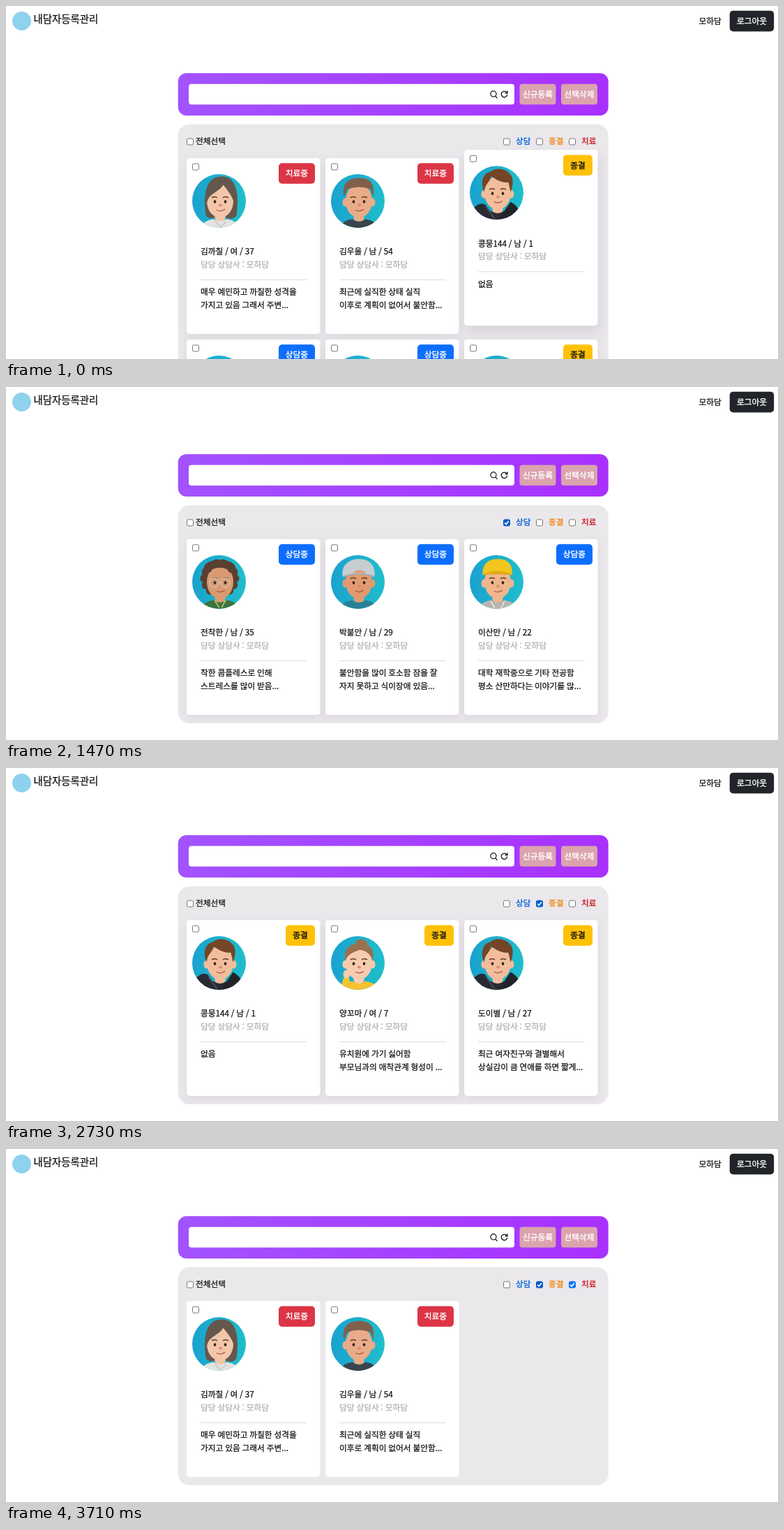
An HTML page for the animation above (3780 ms loop, 1107 by 506 pixels).

```html
<!DOCTYPE html>
<html lang="ko">
<head>
<meta charset="utf-8">
<style>
  html, body { margin: 0; width: 100%; height: 100%; overflow: hidden; background: #fff; }
  svg { display: block; }
  text { font: 11.7px 'Noto Sans CJK KR', 'Noto Sans KR', sans-serif; word-spacing: -.4px; stroke-width: .25px; }
  .shade { filter: drop-shadow(0 5px 7px rgba(30, 20, 60, .075)); }
  .flat .shade { filter: none; }
  .box { fill: #fff; stroke: #767676; }
  .tick { fill: none; stroke: #fff; stroke-width: 1.7; visibility: hidden; }
  .hover .box { stroke: #4a4a4a; }
  .checked .box { fill: #0075ff; stroke: #0075ff; }
  .checked.hover .box { fill: #005cc8; stroke: #005cc8; }
  .checked .tick { visibility: visible; }
</style>
</head>
<body>
<svg id="stage" width="1107" height="506" viewBox="0 0 1107 506"></svg>
<script>
const LOOP = 3780, STEP = 70;
const COUNSELOR = '모하담';

const rect = (x, y, w, h, r, fill, extra = '') =>
  `<rect x="${x}" y="${y}" width="${w}" height="${h}" rx="${r}" fill="${fill}" ${extra}/>`;
const oval = (x, y, rx, ry, fill) => `<ellipse cx="${x}" cy="${y}" rx="${rx}" ry="${ry}" fill="${fill}"/>`;
const path = (d, fill) => `<path d="${d}" fill="${fill}"/>`;
const line = (d, color, width) =>
  `<path d="${d}" fill="none" stroke="${color}" stroke-width="${width}" stroke-linecap="round"/>`;
const at = (x, y, body, extra = '') => `<g transform="translate(${x} ${y})" ${extra}>${body}</g>`;
// y is the visual middle of the line
const text = (x, y, s, fill = '#111', style = '') =>
  `<text x="${x}" y="${y + 4.4}" fill="${fill}" stroke="${fill}" style="${style}">${s}</text>`;
const centered = (x, y, s, fill) => text(x, y, s, fill, 'text-anchor:middle;stroke-width:.35px');
const checkbox = (x, y, id = '') => at(x, y,
  '<rect class="box" x=".5" y=".5" width="9" height="9" rx="1.8"/><path class="tick" d="M2.2 5.2 4.2 7.2 7.9 2.8"/>',
  id && `id="${id}"`);

// Avatars, drawn around the middle of a 77 px disc
const looks = {
  woman: {
    skin: '#f3c6a9', shirt: '#e3e3e1', hair: '#66574d',
    back: h => path('M-19 20C-22 0-23-35 4-35S27 5 25 21Q19 28 10 24H-8Q-15 27-19 20Z', h),
    front: h => path('M-18 4C-22-22-12-35 4-35S26-22 22 5C20-6 14-13 6-23C2-15-12-11-16-2Z', h)
      + line('M-5 30 2 37 10 30', '#c5c6c7', 1.5)
  },
  man: {
    skin: '#eaab88', shirt: '#39454d', hair: '#80604c', ears: true,
    front: h => path('M-20-6C-24-26-13-33 2-33S25-26 22-6L18-17Q2-23-15-17Z', h)
  },
  youth: {
    skin: '#f2bd9b', shirt: '#292b33', hair: '#744526', ears: true,
    front: h => path('M-18-1C-26-20-15-30-9-30C0-38 15-33 18-28C26-22 23-8 20-1L17-15C7-14-1-19-8-24C-9-15-17-13-18-1Z', h)
      + path('M-33 22Q-24 12-16 17L-1 39H-30Z', '#292b33') + path('M20 13Q30 18 33 28L20 39H2Z', '#23242b')
      + line('M-15 20-3 37', '#4b4d56', 2)
  },
  curly: {
    skin: '#d99a72', shirt: '#3d7440', hair: '#594031',
    back: h => curls(h, 22, 14, -5, 22) + oval(1, -7, 26, 25, h),
    front: h => curls(h, 17, 9, -19, 7, Math.PI)
      + [-7, 9].map(x => `<circle cx="${x}" cy="1" r="6.5" fill="none" stroke="#d8c9bd" stroke-width="1.3"/>`).join('')
      + line('M-6 27 0 36M9 27 4 36', '#b9c75f', 1.6)
  },
  greyCap: {
    skin: '#e29a70', shirt: '#2a8197', hair: '#c8cdd1', ears: true,
    front: h => path('M-22-8C-24-25-12-33 2-33S26-24 24-8Q2-14-22-8Z', h)
      + path('M-8-12Q2-22 13-12Q2-14-8-12Z', '#e29a70') + line('M-21-8Q2-15 23-8', '#a5abb0', 2)
  },
  yellowCap: {
    skin: '#efb68d', shirt: '#b8b4b2', hair: '#f4c51e', ears: true,
    front: h => path('M-20-10C-21-27-11-33 2-33S24-26 22-10Q1-18-20-10Z', h)
      + path('M-21-10Q2-22 23-10Q2-12-21-10Z', '#e0ab12') + line('M-8 28-3 37M11 28 7 37', '#eee', 1.5)
  },
  girl: {
    skin: '#f7cbae', shirt: '#f3c32f', hair: '#98714f', ears: true,
    back: h => oval(5, -27, 9, 7, h),
    front: h => path('M-18-3C-22-22-10-28 3-28S25-22 21-3C19-12 13-17 3-19C-4-16-14-14-18-3Z', h)
      + path('M-26 39-20 20-12 22-11 39Z', '#f3c32f') + oval(-16, 16, 5, 6, '#f7cbae')
  }
};

function curls(fill, rx, count, cy, ry, sweep = 2 * Math.PI) {
  let out = '';
  for (let i = 0; i <= count; i++) {
    const a = Math.PI + sweep * i / count;
    out += oval(1 + rx * Math.cos(a), cy + ry * Math.sin(a), 6, 6, fill);
  }
  return out;
}

const avatar = ([name, { skin, shirt, hair, ears, back, front }]) => `<g id="${name}">
  <circle r="38.5" fill="url(#disc)"/><g clip-path="url(#round)">
  ${back ? back(hair) : ''}
  ${rect(-6, 12, 15, 18, 6, skin)}
  ${path('M-28 42Q-25 28-8 26Q1 33 11 26Q28 28 31 42Z', shirt)}
  ${ears ? oval(-18, 2, 4, 6, skin) + oval(21, 2, 4, 6, skin) : ''}
  ${oval(1.5, 0, 19, 24, skin)}
  ${oval(-6, 1, 1.8, 2.3, '#33251f') + oval(9, 1, 1.8, 2.3, '#33251f')}
  ${line('M-10-5Q-6-7-3-5M6-5Q9-7 13-5', '#5b3c2b', 1.5)}
  ${oval(2, 6, 2.4, 2, '#d98d6e')}
  ${line('M-3 13Q3 16 8 12', '#a9503f', 1.3)}
  ${front(hair)}</g></g>`;

// Cards
const badges = {
  treat: ['치료중', '#dc3545', '#fff', 52],
  talk: ['상담중', '#0d6efd', '#fff', 52],
  done: ['종결', '#ffc107', '#111', 42]
};
const people = {
  grumpy: ['woman', 'treat', '김까칠 / 여 / 37', '매우 예민하고 까칠한 성격을', '가지고 있음 그래서 주변...'],
  gloomy: ['man', 'treat', '김우울 / 남 / 54', '최근에 실직한 상태 실직', '이후로 계획이 없어서 불안함...'],
  blank: ['youth', 'done', '콩뭉144 / 남 / 1', '없음', ''],
  kind: ['curly', 'talk', '전착한 / 남 / 35', '착한 콤플레스로 인해', '스트레스를 많이 받음...'],
  anxious: ['greyCap', 'talk', '박불안 / 남 / 29', '불안함을 많이 호소함 잠을 잘', '자지 못하고 식이장애 있음...'],
  restless: ['yellowCap', 'talk', '이산만 / 남 / 22', '대학 재학중으로 기타 전공함', '평소 산만하다는 이야기를 많...'],
  child: ['girl', 'done', '양꼬마 / 여 / 7', '유치원에 가기 싫어함', '부모님과의 애착관계 형성이 ...'],
  parted: ['youth', 'done', '도이별 / 남 / 27', '최근 여자친구와 결별해서', '상실감이 큼 연애를 하면 짧게...']
};
const lists = {
  all: ['grumpy', 'gloomy', 'blank', 'kind', 'anxious', 'child'],
  talk: ['kind', 'anxious', 'restless'],
  done: ['blank', 'child', 'parted'],
  treat: ['grumpy', 'gloomy']
};

function card(person, index) {
  const [look, status, title, first, second] = people[person];
  const [label, color, ink, width] = badges[status];
  const body = rect(0, 0, 191.5, 252, 4.5, '#fff', 'class="shade"')
    + checkbox(8, 7.5)
    + `<use href="#${look}" x="46.5" y="61.5"/>`
    + rect(184 - width, 7.3, width, 29.4, 5, color)
    + centered(184 - width / 2, 22, label, ink)
    + text(20, 134, title) + text(20, 152.5, `담당 상담사 : ${COUNSELOR}`, '#adadad')
    + rect(20, 174, 152, 1, 0, '#dcdcdc')
    + text(20, 192, first) + text(20, 210.5, second);
  return at(259 + index % 3 * 199, 218 + Math.floor(index / 3) * 260, `<g>${body}</g>`);
}
const cardList = ([name, members]) =>
  `<g id="list-${name}" class="${name === 'treat' ? 'flat' : ''}">${members.map(card).join('')}</g>`;

const filters = [['상담', '#1a6fe0'], ['종결', '#ee8c22'], ['치료', '#cc2e33']];

stage.innerHTML = `<defs>
  <linearGradient id="disc"><stop stop-color="#1aa2cf"/><stop offset="1" stop-color="#1fbecb"/></linearGradient>
  <linearGradient id="bar"><stop stop-color="#a253ff"/><stop offset="1" stop-color="#a930ff"/></linearGradient>
  <clipPath id="round"><circle r="38.5"/></clipPath>
  ${Object.entries(looks).map(avatar).join('')}</defs>`
  + oval(22.5, 21.5, 13.5, 13.5, '#8fd2ee')
  + text(39.5, 19.5, '내담자등록관리', '#111', 'font-size:14.4px')
  + text(993.5, 21.5, COUNSELOR)
  + rect(1037.7, 6.8, 63.5, 29.7, 5, '#212529') + centered(1069.5, 21.5, '로그아웃', '#fff')
  + rect(246.7, 96.2, 617, 60.8, 12, 'url(#bar)')
  + rect(262, 111.7, 467, 29.5, 4, '#fff')
  + line('M702 129.5 704.3 131.8M703 126a4.1 4.1 0 1 1-8.2 0a4.1 4.1 0 1 1 8.2 0', '#111', 1.2)
  + line('M718.6 127.3a4.2 4.2 0 1 1-1.2-3.8l1.2 1.2M718.9 122v2.9h-2.9', '#111', 1.3)
  + rect(736.5, 111.7, 52, 29.5, 4, '#dba3ae') + centered(762.5, 126.5, '신규등록', '#fff')
  + rect(796, 111.7, 52, 29.5, 4, '#dba3ae') + centered(822, 126.5, '선택삭제', '#fff')
  + rect(246.7, 169.5, 617, 312.5, 16, '#ebe8ec', 'id="panel"')
  + checkbox(259, 189.5) + text(272, 193.5, '전체선택')
  + filters.map(([label, color], i) => checkbox(713 + 47 * i, 189.5, 'filter' + i)
    + text(731 + 47 * i, 193.5, label, color, 'font-weight:700;stroke-width:0')).join('')
  + Object.entries(lists).map(cardList).join('');

// Timeline in ms
const shownFrom = [[0, 'all'], [840, 'talk'], [1680, 'all'], [2170, 'done'], [2940, 'all'], [3500, 'treat']];
const checkedSpans = [[[700, 1540]], [[2030, 2800], [3710, LOOP]], [[3360, LOOP]]];
const hoverSpans = [[[210, 1680]], [[1750, 3010], [3640, LOOP]], [[3150, 3640]]];
const inside = (t, spans) => spans.some(([from, to]) => t >= from && t < to);

// CSS "ease" curve
function ease(x) {
  if (x <= 0 || x >= 1) return x <= 0 ? 0 : 1;
  const curve = (s, a, b) => 3 * (1 - s) ** 2 * s * a + 3 * (1 - s) * s * s * b + s ** 3;
  let low = 0, high = 1;
  for (let i = 0; i < 20; i++) {
    const mid = (low + high) / 2;
    if (curve(mid, .25, .25) < x) low = mid; else high = mid;
  }
  return curve(low, .1, 1);
}

const $ = id => document.getElementById(id);
const hoveredCard = $('list-all').children[2].firstChild;
const hoveredShade = hoveredCard.querySelector('.shade');

function draw(now) {
  const t = Math.floor(now % LOOP / STEP) * STEP;
  const shown = shownFrom.filter(([from]) => t >= from).pop()[1];
  for (const name in lists) $('list-' + name).style.display = name === shown ? '' : 'none';
  $('panel').setAttribute('height', shown === 'all' ? 600 : 312.5);
  filters.forEach((_, i) => {
    const { classList } = $('filter' + i);
    classList.toggle('checked', inside(t, checkedSpans[i]));
    classList.toggle('hover', inside(t, hoverSpans[i]));
  });
  const lift = 1 - ease((t - 135) / 500);
  hoveredCard.setAttribute('transform', `translate(0 ${-11.7 * lift})`);
  hoveredShade.style.filter =
    `drop-shadow(${2 * lift}px ${5 + 4 * lift}px ${7 + lift}px rgba(30, 20, 60, ${.075 + .03 * lift}))`;
  requestAnimationFrame(() => draw(performance.now()));
}
draw(0);
</script>
</body>
</html>
```
